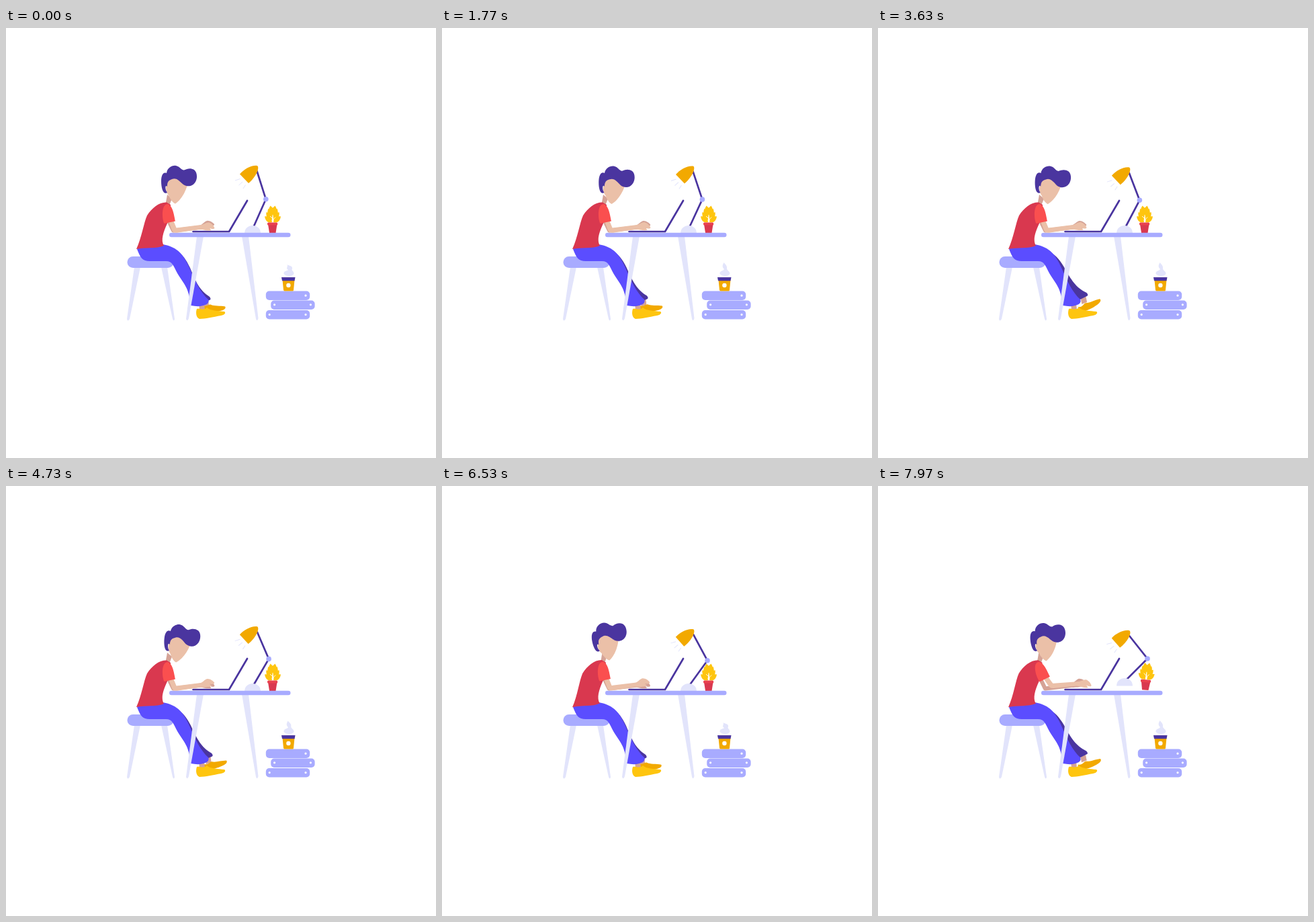
Animation of 640x640 px, one loop 8000 ms. Source, as an HTML page:

```html
<!DOCTYPE html>
<html lang="en">
<head>
<meta charset="utf-8">
<title>Working at a desk</title>
<style>
  html, body { margin: 0; width: 100%; height: 100%; overflow: hidden; background: #fff; }
  svg { display: block; width: 100%; height: 100%; }
  .lavender { fill: #a8abff; }
  .pale { fill: #e2e4fb; }
  .purple { fill: #4a359f; }
  .yellow { fill: #fec50f; }
  .orange { fill: #f2a900; }
  .red { fill: #d9384f; }
  .skin { fill: #ebc0a8; }
  .shade { fill: #d5a396; }
  .white { fill: #fff; }
  .line { fill: none; stroke: #4a359f; stroke-width: 2.7; stroke-linecap: round; stroke-linejoin: round; }
</style>
</head>
<body>
<svg viewBox="0 0 640 640">
  <defs>
    <path id="hand" d="M289 293.5C294 292 297 288 301 288C305 288.5 309 292 310.5 295C310 297.5 306 297 303 296L306 299C302 301 296 300 289 299.5Z"/>
    <rect id="book" width="65.4" height="13.4" rx="5"/>
  </defs>

  <g class="pale">
    <path d="M191 356H200L184 433Q181 438 180 433Z"/>
    <path d="M231 356H240L251 433Q250 438 248 433Z"/>
  </g>
  <rect class="lavender" x="180.5" y="340" width="69" height="17" rx="8.5"/>

  <g id="backLeg">
    <path class="shade" d="M293 403L301 402L302 414L294 416Z"/>
    <path class="purple" d="M248 330C260 333 267 342 274 357C283 379 288 390 303 400Q306 404 303 405L292 409C276 392 268 370 248 347Z"/>
  </g>
  <path id="backShoe" class="orange" d="M292 413C298 416 301 411 304 411C310 413.5 318 411.5 326 412.5C328 415 325 418 319 419.5C311 422 300 423 293 421C290 418 291 415 292 413Z"/>
  <path class="shade" d="M287 410H295L296 420H288Z"/>
  <path class="yellow" d="M284 418C288 416.5 294 421 299 416C304 421 316 421 325 422C328 424 325 427 320 428C308 430 297 433 288 433C283 431 282 424 284 418Z"/>
  <path fill="#5b4dff" d="M195 329C200 342 203 347 214 347H238C248 347 249 354 255 365C265 382 272 385 275 413Q290 416 299 411Q303 408 301 404C289 393 282 377 274 359C264 337 256 326 233 322L205 322Z"/>

  <g class="pale">
    <path d="M284 310H294L272 432Q270 438 268 433Z"/>
    <path d="M351 310H361L375.5 432Q374 438 372 433Z"/>
  </g>

  <path id="lampArm" class="line"/>
  <circle id="lampJoint" class="lavender" r="3.8"/>
  <path id="lampBase" class="pale" d="M355 305.5C355 290 379 290 379 305.5Z"/>
  <g id="lampHead">
    <path class="orange" d="M348 217.5C354 210 366 203.5 374 205C378 208 372 222 361 231Z"/>
    <path d="M341 227L348.5 224.5M346.5 234L352 229M353 239L356.5 233.5" fill="none" stroke="#e2e4fb"/>
  </g>

  <g id="plant">
    <g id="leaves" class="yellow"></g>
    <path d="M397 290V278M397 286L401 281.5M397 284L393 280" fill="none" stroke="#fff" stroke-width=".9"/>
    <path class="red" d="M390 292H403.5L401.5 305H392Z"/>
    <rect x="389" y="289.5" width="15.2" height="4" rx="1.5" fill="#e9414f"/>
  </g>
  <rect class="lavender" x="243" y="304.7" width="180.5" height="6.6" rx="3.3"/>
  <path class="line" d="M359 257L332 303H278.5"/>

  <g class="lavender">
    <use href="#book" x="386.8" y="391.6"/>
    <use href="#book" x="394.2" y="405.6"/>
    <use href="#book" x="386.8" y="420"/>
  </g>
  <path d="M446 398.2h0M399.6 411.8h0M453.4 411.8h0M392.2 426.6h0M446 426.6h0" stroke="#fff" stroke-width="3.2" stroke-linecap="round"/>

  <path id="steam" class="pale"/>
  <path class="orange" d="M411.5 375H429.5L428 390Q428 391.5 426.5 391.5H415Q413.5 391.5 413 390Z"/>
  <path class="purple" d="M410 371H430.5L429.5 376.2H411Z"/>
  <circle class="white" cx="420.4" cy="383" r="3.2"/>

  <g id="backArm">
    <path d="M241 285L249 301.5L291 296.5" fill="none" stroke="#d5a396" stroke-width="6" stroke-linejoin="round"/>
    <use id="backHand" href="#hand" class="shade"/>
    <path d="M236 268H244L250 285L237 291Z" fill="#c22f44"/>
  </g>
  <g id="torso">
    <path class="shade" d="M240 248L247 254L243.5 263L237.5 262Z"/>
    <path class="red" d="M194 329C202 312 205 290 210 279C217 268 228 259 239 259.5L245 263C245 275 243 282 240 291C234 304 230 316 235 324C224 329 208 326 194 329Z"/>
    <g id="head">
      <path class="skin" d="M239 233C240 226 248 221 255 222L270 234C266 247 260 256 252 261.5C248 260 244 254 242 249C239 246 237 240 239 233Z"/>
      <path class="purple" d="M240 245C234 249 231 238 231 228C231 219 234 214 239 216C240 208 247 204 253 205C259 206 260 211 265 211.5C270 209 275 208 280 211C285 215 285 224 282 229C278 236 270 237 264 233C258 228 254 222 247 225C240 227 240 232 240 236C237 232 236 240 240 245Z"/>
    </g>
  </g>
  <g id="frontArm">
    <g id="forearm">
      <path class="skin" d="M247 300Q249 297.5 254 297.5L292 292.8V299L256 304.5Q249 306 247 300Z"/>
      <use id="frontHand" href="#hand" class="skin"/>
    </g>
    <path class="skin" d="M241 285H248.5L254 298.5L250 304.5Q247.5 303 246.5 300Z"/>
    <path fill="#fa4f4f" d="M240 262C248 263 250 278 252 287.5L235.5 291C232 284 231 263 240 262Z"/>
  </g>
</svg>

<script>
const LOOP = 8000;
const TYPING = 257;
const TAPPING = 343;

const byId = id => document.getElementById(id);
const set = (id, name, value) => byId(id).setAttribute(name, value);
const move = (id, value) => set(id, 'transform', value);

// Eases from 0 to 1 between two times.
function ramp(t, from, to) {
  const u = Math.min(1, Math.max(0, (t - from) / (to - from)));
  return u * u * (3 - 2 * u);
}

// Leaf pairs climb the stem and turn upright.
function leafPair(i) {
  return [-1, 1].map(side => `<path d="M0 0Q7.5 -6 0 -14Q-7.5 -6 0 0Z"
    transform="translate(${397 + side} ${289 - 3.6 * i}) rotate(${side * (52 - 14 * i)})"/>`).join('');
}
byId('leaves').innerHTML = Array.from({ length: 4 }, (_, i) => leafPair(i)).join('');

function drawPerson(t) {
  const raised = ramp(t, 6600, 7130) - ramp(t, 7560, 7950);
  const slam = ramp(t, 7600, 7970);
  const leanBack = ramp(t, 5030, 5850) * .4 + raised * .6 - slam * .2;
  const nod = 3 * ramp(t, 0, 900) + 3 * ramp(t, 3300, 4600);

  const torso = -2.6 * leanBack;
  const head = nod - 15 * ramp(t, 5030, 5850) - 9 * raised + 4 * slam;
  move('torso', `rotate(${torso} 213 328)`);
  move('head', `rotate(${head - torso} 242 272)`);

  const shoulder = -77 * raised - 14 * slam;
  const elbow = -13 * raised + 17 * slam;
  move('frontArm', `translate(${torso} ${torso * .5}) rotate(${shoulder} 240 268)`);
  move('forearm', `rotate(${elbow} 251 301)`);
  move('backArm', `translate(${torso * .4} 0)`);

  const typing = 8 * Math.cos(2 * Math.PI * t / TYPING);
  move('frontHand', `rotate(${typing * (1 - raised)} 291 296)`);
  move('backHand', `rotate(${-typing} 291 296)`);

  const phase = 2 * Math.PI * (t / TAPPING + .15 * ramp(t, 6530, 7400));
  const swing = (1 - Math.cos(phase)) / 2;
  move('backLeg', `rotate(${-7.5 * swing} 258 336)`);
  move('backShoe', `translate(${7 * swing} 0) rotate(${4 - 23 * swing + 4 * Math.sin(phase)} 298 415)`);
}

// The lamp sinks ever faster, then everything hops when the hand lands.
function drawDesk(t) {
  const jump = ramp(t, 7880, 7970);
  const drop = 12 * (t / 7900) ** 2 - 2 * jump;
  const x = 386.8 + drop + 4 * jump;
  const y = 254.8 + .6 * drop - 4 * jump;
  set('lampArm', 'd', `M${368 + jump} ${297 - 8 * jump}L${x} ${y}L${373.5 + drop * .08} ${213 + drop}`);
  move('lampJoint', `translate(${x} ${y})`);
  move('lampBase', `translate(0 ${-8 * jump})`);
  move('lampHead', `translate(0 ${drop}) rotate(${drop * .28} 374 212)`);
  move('plant', `translate(${jump} ${-1.3 * jump}) rotate(${4 * jump} 397 305)`);
}

function drawSteam(t) {
  const rise = ramp(t, 0, 900) - ramp(t, 4200, 6400) + ramp(t, 7500, 7970);
  const top = 352 - 3 * rise;
  set('steam', 'd', `M413.5 366C413 361 418 362 420 ${360 - rise}
    C416 ${358 - 3 * rise} ${420 - 2 * rise} ${top + 3} ${418.5 + rise} ${top}
    C421 ${top + 2} ${427 - 2 * rise} 354 ${426 - 2 * rise} 358
    C424 361 429 362 428.5 366C427 370 416 370 413.5 366Z`);
}

const start = performance.now();
function tick() {
  const t = (performance.now() - start) % LOOP;
  drawPerson(t);
  drawDesk(t);
  drawSteam(t);
  requestAnimationFrame(tick);
}
tick();
</script>
</body>
</html>
```
